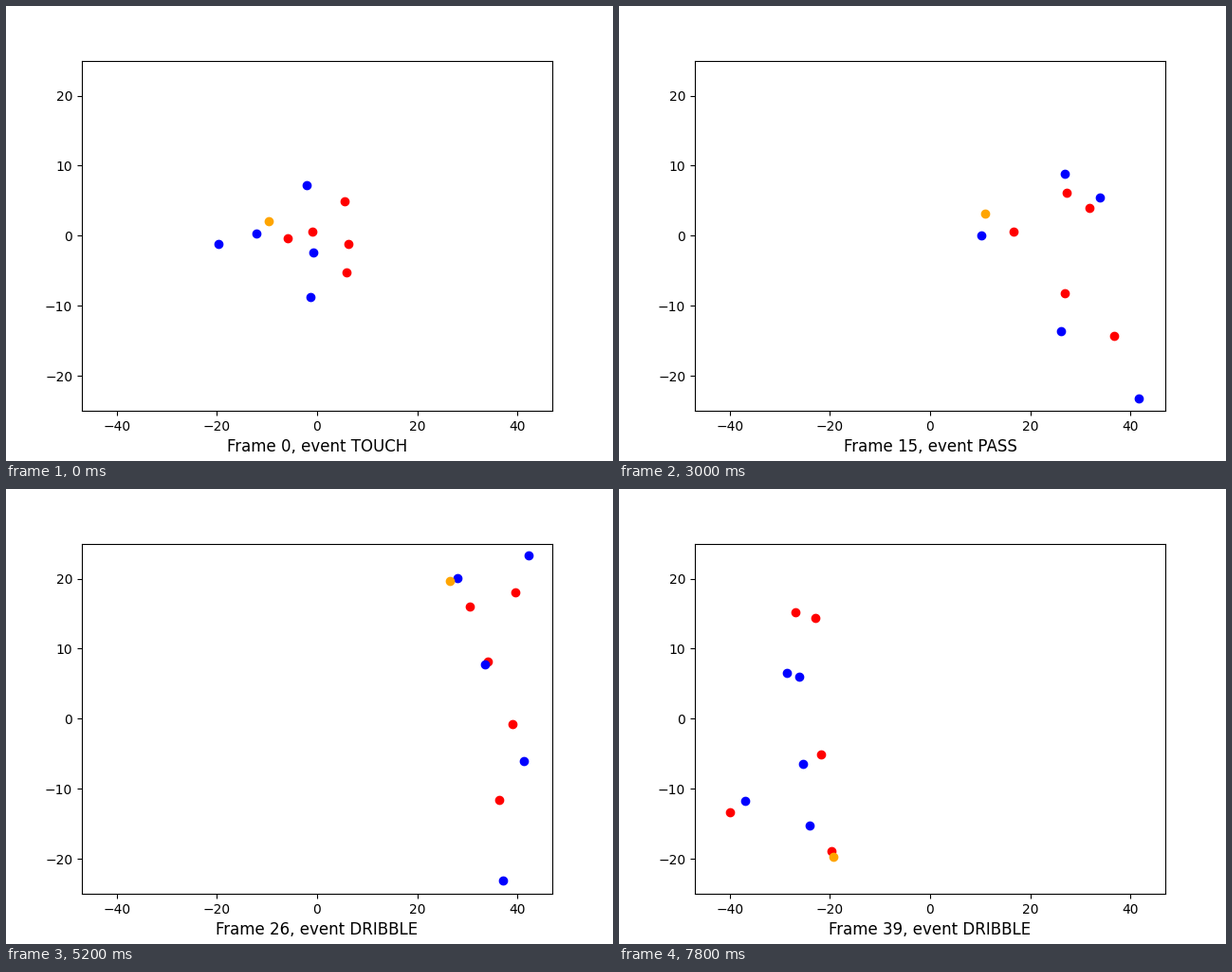
Write a matplotlib script that moves like this. It is 640 px wide and 480 px high and loops after 8 s.

```python
import matplotlib.pyplot as plt
import numpy as np
from matplotlib.animation import FuncAnimation

W, H, DPI = 640, 480, 100
FRAMES, INTERVAL = 40, 200

# Key moments in stage pixels: step, attacking side, ball, five attackers.
# The defenders follow from these.
RIGHT_HOOP, LEFT_HOOP = (548, 242), (108, 242)
PLAYS = [
    (0, "blue", (277, 227),
     [(224, 251), (317, 189), (324, 260), (321, 307), (264, 240)]),
    (9, "blue", (357, 276),
     [(364, 226), (510, 233), (385, 370), (536, 411), (355, 281)]),
    (15, "blue", (386, 219),
     [(470, 177), (507, 202), (466, 343), (548, 414), (382, 242)]),
    (19, "blue", (441, 348),
     [(517, 68), (540, 95), (473, 317), (479, 380), (436, 321)]),
    (26, "blue", (468, 97),
     [(476, 94), (551, 70), (546, 287), (524, 413), (505, 185)]),
    (31, "red", (555, 228),
     [(389, 101), (456, 232), (584, 238), (482, 306), (542, 211)]),
    (39, "red", (226, 388),
     [(186, 130), (207, 136), (224, 382), (117, 341), (213, 280)]),
]

# Step at which each event begins.
EVENTS = [(0, "TOUCH"), (2, "DRIBBLE"), (15, "PASS"), (16, "DRIBBLE"),
          (19, "PASS"), (20, "TOUCH"), (21, "DRIBBLE"), (30, "TOUCH"),
          (33, "DRIBBLE")]


def guard(men, hoop, ball):
    """Each defender stands off his man, towards the hoop and the ball."""
    return men + 0.2 * (hoop - men) + 0.16 * (ball - men)


def lineup(side, ball, attackers):
    """Positions of every dot, by colour, at a key moment."""
    men, ball = np.array(attackers, float), np.array(ball, float)
    hoop = np.array(RIGHT_HOOP if side == "blue" else LEFT_HOOP)
    other = "red" if side == "blue" else "blue"
    return {side: men, other: guard(men, hoop, ball), "orange": ball[None]}


STEPS = [play[0] for play in PLAYS]
LINEUPS = [lineup(*play[1:]) for play in PLAYS]


def positions(color, step):
    """Straight run between the two nearest key moments, in data units."""
    i = min(np.searchsorted(STEPS, step, side="right"), len(STEPS) - 1)
    t = (step - STEPS[i - 1]) / (STEPS[i] - STEPS[i - 1])
    start, end = LINEUPS[i - 1][color], LINEUPS[i][color]
    x, y = (start + t * (end - start)).T
    return ax.transData.inverted().transform(np.column_stack([x, H - y])).T


def event_at(step):
    return [name for start, name in EVENTS if start <= step][-1]


fig, ax = plt.subplots(figsize=(W / DPI, H / DPI), dpi=DPI)
ax.set_xlim(-47, 47)
ax.set_ylim(-25, 25)
dots = {color: ax.plot([], [], "o", color=color)[0]
        for color in ("red", "blue", "orange")}
label = ax.set_xlabel("", fontsize=12)


def update(step):
    for color, line in dots.items():
        line.set_data(*positions(color, step))
    label.set_text(f"Frame {step}, event {event_at(step)}")
    return [*dots.values(), label]


anim = FuncAnimation(fig, update, frames=FRAMES, interval=INTERVAL,
                     repeat=True, repeat_delay=0, blit=False)
plt.show()
```
